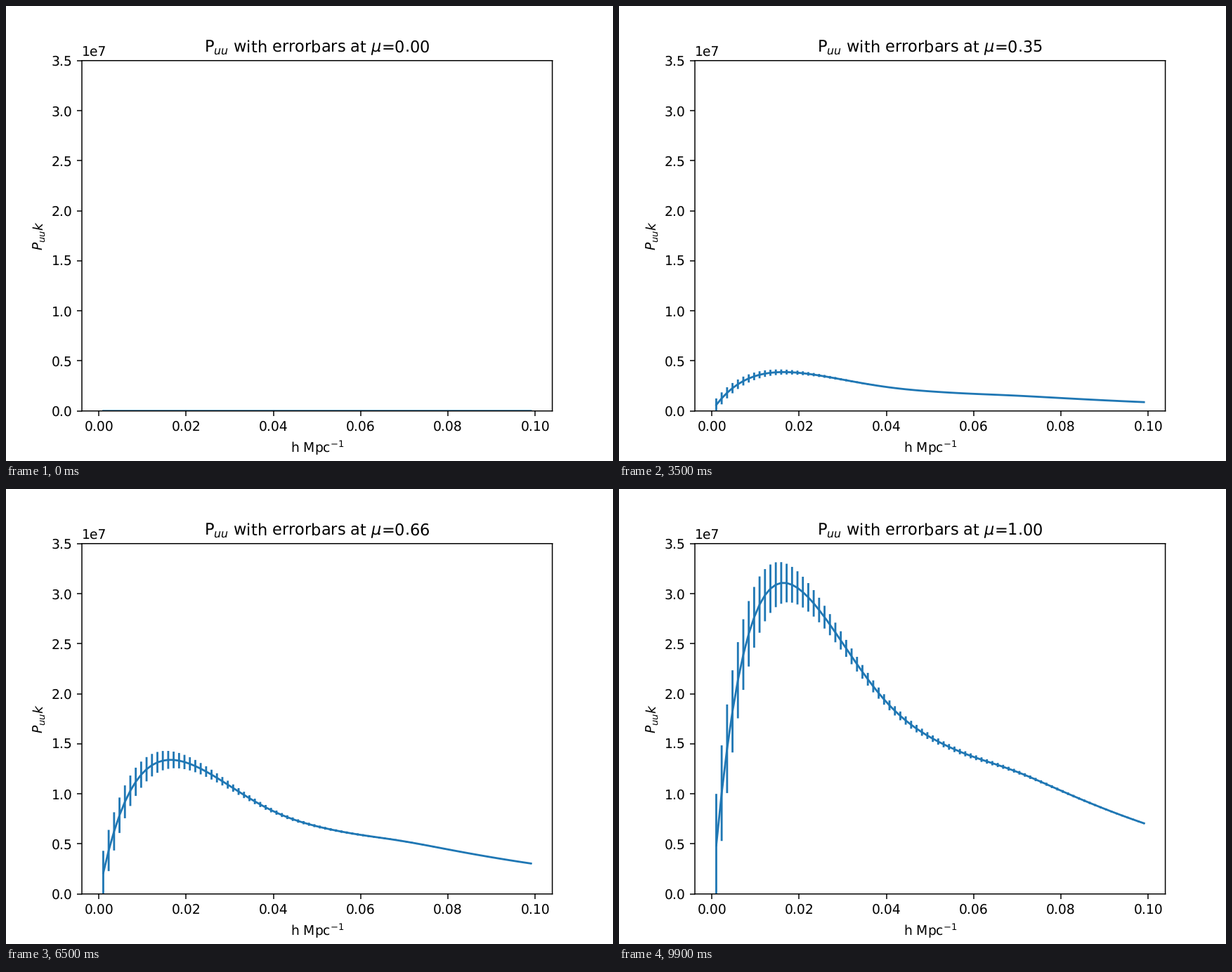
A matplotlib script that plays this animation: 864x648 px, repeating every 10000 ms.

```python
import matplotlib.pyplot as plt
import numpy as np
from matplotlib.animation import FuncAnimation

FRAMES = 100
INTERVAL = 100

# Unhinted, unsnapped drawing keeps sub-pixel positions
plt.rcParams.update({"path.snap": False, "text.hinting": "none"})

k = np.linspace(0.001, 0.099, 80)
mus = np.linspace(0, 1, FRAMES)


def decay_rate(k):
    """Steep fall-off that relaxes past the turnover, with one acoustic dip."""
    relax = 29.8 / (1 + np.exp((0.0425 - k) / 0.0047))
    dip = 5 * np.exp(-((k - 0.0643) / 0.0085) ** 2)
    return 61 - relax - dip


rate = decay_rate(k)
depth = np.append(0, np.cumsum((rate[1:] + rate[:-1]) / 2 * np.diff(k)))
power = 4.847e9 * k * np.exp(-depth)
sigma = 5.15e6 * np.exp(-depth)

fig, ax = plt.subplots(figsize=(6.4, 4.8), dpi=135)
line, _, (bars,) = ax.errorbar(k, power, yerr=sigma)
ax.set_ylim(0, 3.5e7)
ax.set_xlabel(r"h Mpc$^{-1}$")
ax.set_ylabel(r"$P_{uu} k$")
title = ax.set_title("")


def update(frame):
    mu = mus[frame]
    y, e = power * mu**2, sigma * mu**2
    line.set_ydata(y)
    bars.set_segments([[(x, lo), (x, hi)] for x, lo, hi in zip(k, y - e, y + e)])
    title.set_text(rf"P$_{{uu}}$ with errorbars at $\mu$={mu:.2f}")
    return line, bars, title


anim = FuncAnimation(fig, update, frames=FRAMES, interval=INTERVAL,
                     repeat=True, repeat_delay=0, blit=False)
plt.show()
```
